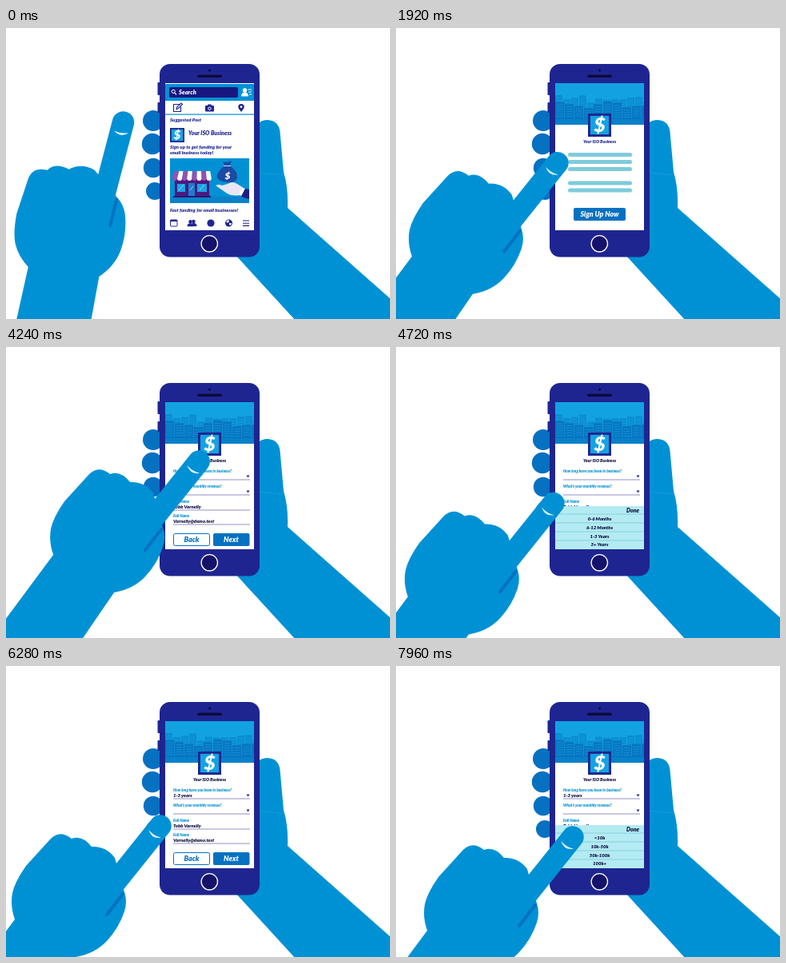
Recreate the animation shown at these times as an HTML page. Size 480x364 px, loop 8 s.

```html
<!DOCTYPE html>
<html lang="en">
<head>
<meta charset="utf-8">
<title>Phone sign-up</title>
<style>
html, body { margin: 0; width: 100%; height: 100%; overflow: hidden; background: #fff; }
svg { display: block; width: 100vw; height: 100vh; }
text { font: italic 900 6px Lato, "Open Sans", sans-serif; }
</style>
</head>
<body>
<svg id="stage" viewBox="0 0 480 364"></svg>
<script>
const BLUE = '#0091d5', DEEP = '#0671c1', NAVY = '#1f2590', INK = '#0c0b3c', PALE = '#b3ebf3';
const stage = document.getElementById('stage');

const rect = (x, y, w, h, fill, r = 0, more = '') =>
  `<rect x="${x}" y="${y}" width="${w}" height="${h}" fill="${fill}" rx="${r}" ${more}/>`;
const circle = (x, y, r, fill, more = '') => `<circle cx="${x}" cy="${y}" r="${r}" fill="${fill}" ${more}/>`;
const path = (d, fill, more = '') => `<path d="${d}" fill="${fill}" ${more}/>`;
const line = (d, color, w = 1, more = '') => path(d, 'none', `stroke="${color}" stroke-width="${w}" ${more}`);
const text = (x, y, s, size, fill = NAVY, anchor = 'start') =>
  `<text x="${x}" y="${y}" fill="${fill}" text-anchor="${anchor}" style="font-size:${size}px">${s}</text>`;
const group = (id, body) => `<g id="${id}">${body}</g>`;
const screen = fill => rect(199, 69, 111, 184, fill);
const person = (x, y, fill) => circle(x, y, 2.2, fill) + path(`M${x - 4},${y + 6}q0-4 4-4t4 4z`, fill);

function logo(x, y, size) {
  const b = size * .1;
  return rect(x, y, size, size, NAVY) + rect(x + b, y + b, size - 2 * b, size - 2 * b, '#13a3e2') +
    text(x + size / 2, y + size * .8, '$', size * .84, '#fff', 'middle');
}

function shop() {
  let s = rect(211, 189, 43, 22, '#4b1a83');
  for (let i = 0; i < 8; i++) {
    const x = 208 + i * 6.1;
    s += path(`M${x + (3.5 - i) * .5 + 1},179h5.2L${x + 6.1},188a3,3 0 0 1-6.1,0z`, i % 2 ? '#fff' : '#9b4fae');
  }
  return s + rect(214, 195, 10, 10, '#1aa5e4') + rect(228, 194, 8, 17, '#1b7ed0') + rect(239, 195, 12, 10, '#1aa5e4') +
    line('M216,203l6-7M242,203l6-7M230,203l4-5', '#8cd5f2') + rect(209, 210, 47, 2, '#2d1674');
}

const picture = () => rect(205, 163, 99, 56, BLUE) + rect(205, 211, 99, 8, '#0a82ca') + shop() +
  path('M273,172l-2-5q6 2 11-1l-2 6q10 8 9 15t-12 6-13-6 9-15z', '#1c4aa4') + line('M272,172.5h9', '#fff', .8) +
  text(277, 189, '$', 12, '#fff', 'middle') +
  path('M262,197q4-2 8 0l7-2q6-4 12 0l8 5-4 9q-12 2-18-3z', '#e8e6f6') +
  path('M291,208l5-8 3 1-5 9z', '#fff') + path('M294,211l5-10 5 1v12z', '#211d7d');

const tabs = () =>
  line('M217,95.5h-7.5v9h9v-6M213,101.5l1-3 5-4.5 1.5 1.5-5 5z', NAVY, 1.1) +
  rect(249, 97, 11, 7.5, NAVY, 1) + rect(252, 95.5, 5, 3, NAVY, 1) + circle(254.5, 100.7, 1.7, NAVY, 'stroke="#fff"') +
  path('M294,105c-2-3-3.8-4.5-3.8-6.3a3.8,3.8 0 0 1 7.6,0c0,1.8-1.8,3.3-3.8,6.3z', NAVY) + circle(294, 98.7, 1.4, '#fff');

const menu = () => rect(205.5, 240, 8.5, 8, 'none', 1, `stroke="${NAVY}"`) + rect(205.5, 240, 8.5, 2, NAVY) +
  person(234.5, 242, NAVY) + person(230.5, 242.3, NAVY) + circle(256, 244, 4.6, NAVY) +
  circle(278.5, 244, 4.5, NAVY) + path('M275,242l3-2 1 2-2 2zM279,244l3 0-1 3-2-1z', '#fff') +
  line('M296,241h8M296,244.2h8M296,247.4h8', NAVY, 1.1);

const feed = () => screen('#fff') + rect(199, 70, 111, 21, BLUE) + rect(204, 74, 86, 13, '#19177f', 2) +
  line('M210.8,81.2l2.2 2.2', '#fff', 1.2) + circle(209.2, 79.4, 2.1, 'none', 'stroke="#fff"') + text(216, 83, 'Search', 7.5, '#fff') +
  circle(298.5, 78, 2.7, '#fff') + path('M294,85.5q0-5 4.5-5t4.5 5z', '#fff') + line('M302.5,77h4.5M303,80h4M304,83h3', '#fff', 1.2) +
  rect(199, 107.5, 111, 1.2, BLUE) + tabs() + text(205, 117, 'Suggested Post', 6) + logo(205, 125, 18) +
  text(228, 133.5, 'Your ISO Business', 7.1) + text(205, 151, 'Sign up to get funding for your', 6) +
  text(205, 158, 'small business today!', 6) + picture() + text(205, 229.5, 'Fast funding for small businesses!', 6) + menu();

function city() {
  let s = rect(199, 69, 111, 52, '#12a2e2');
  let seed = 11;
  const rnd = () => (seed = seed * 16807 % 2147483647) / 2147483647;
  const row = (color, glow, top, step) => {
    for (let x = 199; x < 310; x += step + 1) {
      const w = Math.min(step, 310 - x), y = top + rnd() * 11;
      s += rect(x, y, w, 116 - y, color);
      for (let j = y + 3; j < 112; j += 3) s += rect(x + 1.5, j, Math.max(w - 3, 0), .8, glow);
    }
  };
  row('#0b8dd2', '#129ddf', 84, 9);
  row('#0876c2', '#1295d8', 91, 11);
  return s + rect(199, 113, 111, 8, '#0880c9') + rect(199, 113, 111, 1, DEEP);
}

const landing = () => text(254.5, 143.5, 'Your ISO Business', 5.4, NAVY, 'middle') +
  [156, 165, 174, 191.5, 200.5].map(y => rect(215, y, 80, 5, '#7fcbdc', 2.5)).join('') +
  rect(222, 225, 65, 16, DEEP, 2) + text(254.5, 236, 'Sign Up Now', 8.8, '#fff', 'middle');

function form() {
  const field = (y, label, value = '') => text(209, y - 9.5, label, 4.7, BLUE) + text(209, y - 2, value, 6, INK) +
    line(`M209,${y}h96`, '#4a46a3', .6);
  const arrow = y => path(`M300.5,${y}h4l-2 3z`, NAVY);
  return text(254.5, 144, 'Your ISO Business', 5.4, INK, 'middle') +
    field(166, 'How long have you been in business?') + group('years', text(209, 164, '1-3 years', 6, INK)) +
    field(185, 'What’s your monthly revenue?') + arrow(160.5) + arrow(179.5) +
    field(204, 'Full Name', 'Tobb Varnelly') + field(222, 'Full Name', 'Varnelly@demo.test') +
    rect(209.5, 233.5, 45, 15, '#fff', 2, `stroke="${DEEP}"`) + text(232, 244, 'Back', 9, DEEP, 'middle') +
    rect(259, 233, 45.5, 16, DEEP, 2) + text(281.5, 244, 'Next', 9, '#fff', 'middle');
}

const options = (id, list) => group(id, list.map((s, i) => text(254.5, 216.7 + i * 10.9, s, 6, INK, 'middle')).join(''));
const panel = () => rect(199, 199, 111, 55, PALE) + text(304, 207, 'Done', 7, INK, 'end') +
  line('M199,209h111m-111,11h111m-111,11h111m-111,11h111', '#6dbccb', .6) +
  options('ages', ['0-6 Months', '6-12 Months', '1-3 Years', '3+ Years']) +
  options('sums', ['&lt;10k', '10k-50k', '50k-100k', '100k+']);

const holder = () =>
  path('M290,130L312,130Q313,115 327,115Q341,116 342.5,130L347,180Q353,200 352,225L482,340V366H362L286,283z', BLUE) +
  line('M318,181.5L348,184', '#2b9fdb', .6) +
  circle(184, 116, 13, DEEP) + circle(183, 145, 13.2, DEEP) + circle(184, 175, 12.2, DEEP) + circle(186, 204, 11, DEEP);

const phone = () => rect(189.5, 68, 4, 16, NAVY, 1) + rect(189.5, 93, 4, 13, NAVY, 1) + rect(192, 45, 125, 241.5, NAVY, 13) +
  circle(254.5, 53, 1.5, INK) + rect(239, 58.5, 31, 3.5, INK, 1.7) + screen('#fff') +
  circle(254.3, 269.8, 10.2, '#15126b', 'stroke="#fff" stroke-width="1.3"');

const pointer = () =>
  path('M-103,451L17,289L20,285Q14,268 17,252Q20,238 34,218L64,185Q76,172 91,184Q104,179 116,194Q134,193 145,208' +
    'L157,251Q161,262 157,275Q150,296 135,312Q120,328 96,332L-8,484z', BLUE) +
  line('', BLUE, 27.5, 'id="finger" stroke-linecap="round"') +
  line('M155,253L135,279', DEEP, 4, 'stroke-linecap="round"') +
  path('M-10.5,11.5Q-1.5,20 8,12.5Q-1.5,15 -10.5,11.5z', '#e4f5fc', 'id="nail"');

stage.innerHTML = `<clipPath id="glass">${screen('#fff')}</clipPath>` + holder() + phone() +
  `<g clip-path="url(#glass)">` + group('feed', feed()) +
  group('site', city() + group('landing', landing()) + group('form', form()) + logo(240, 107, 29) + group('panel', panel())) +
  `</g>` + group('pointer', pointer());

const el = id => document.getElementById(id);
const show = (id, on) => el(id).setAttribute('display', on ? 'inline' : 'none');
const ramp = (t, from, ms) => {
  const u = Math.max(0, Math.min(1, (t - from) / ms));
  return u * u * (3 - 2 * u);
};

// hand moves: start time, end time, fingertip x, y
const moves = [
  [1440, 1630, 222, 163], [1785, 2080, 176, 176],
  [2440, 2680, 226, 205], [2960, 3160, 193, 200],
  [4040, 4280, 245, 138.5], [4520, 4760, 193, 200],
  [5080, 5320, 237, 206], [5680, 5810, 276, 186], [6070, 6280, 193, 200],
  [6720, 6960, 242, 165], [7190, 7400, 214.5, 214.5],
  [7880, 7960, 221, 214]
];
// finger presses: down, up
const taps = [[1610, 1710], [2680, 2880], [4280, 4440], [5320, 5460], [5800, 6000], [6960, 7110]];

function draw(t) {
  let x = 146.5, y = 118, bend = 0;
  for (const [from, to, toX, toY] of moves) {
    const u = ramp(t, from, to - from);
    x += (toX - x) * u;
    y += (toY - y) * u;
  }
  for (const [down, up] of taps) bend += ramp(t, down, 80) - ramp(t, up, 80);
  const turn = -24 * (1 - ramp(t, 1440, 190));

  const mix = (a, b) => a + (b - a) * bend;
  const tipX = mix(202, 217), tipY = mix(168, 199);
  el('pointer').setAttribute('transform', `translate(${x} ${y}) rotate(${turn}) translate(-202 -168)`);
  el('finger').setAttribute('d', `M130,258Q${mix(166, 176)},${mix(213, 194)} ${tipX},${tipY}`);
  el('nail').setAttribute('transform', `translate(${tipX} ${tipY}) rotate(${mix(29, 88)})`);

  show('feed', t < 1720);
  show('site', t >= 1720);
  show('landing', t < 2780);
  show('form', t >= 2780);
  show('years', t >= 5440);
  show('ages', t < 6500);
  show('sums', t >= 6500);
  const open = ramp(t, 4400, 160) - ramp(t, 6000, 160) + ramp(t, 7080, 160);
  el('panel').setAttribute('transform', `translate(0 ${56 * (1 - open)})`);
}

let start;
function tick(now) {
  start ??= now;
  draw((now - start) % 8000);
  requestAnimationFrame(tick);
}
draw(0);
requestAnimationFrame(tick);
</script>
</body>
</html>
```
